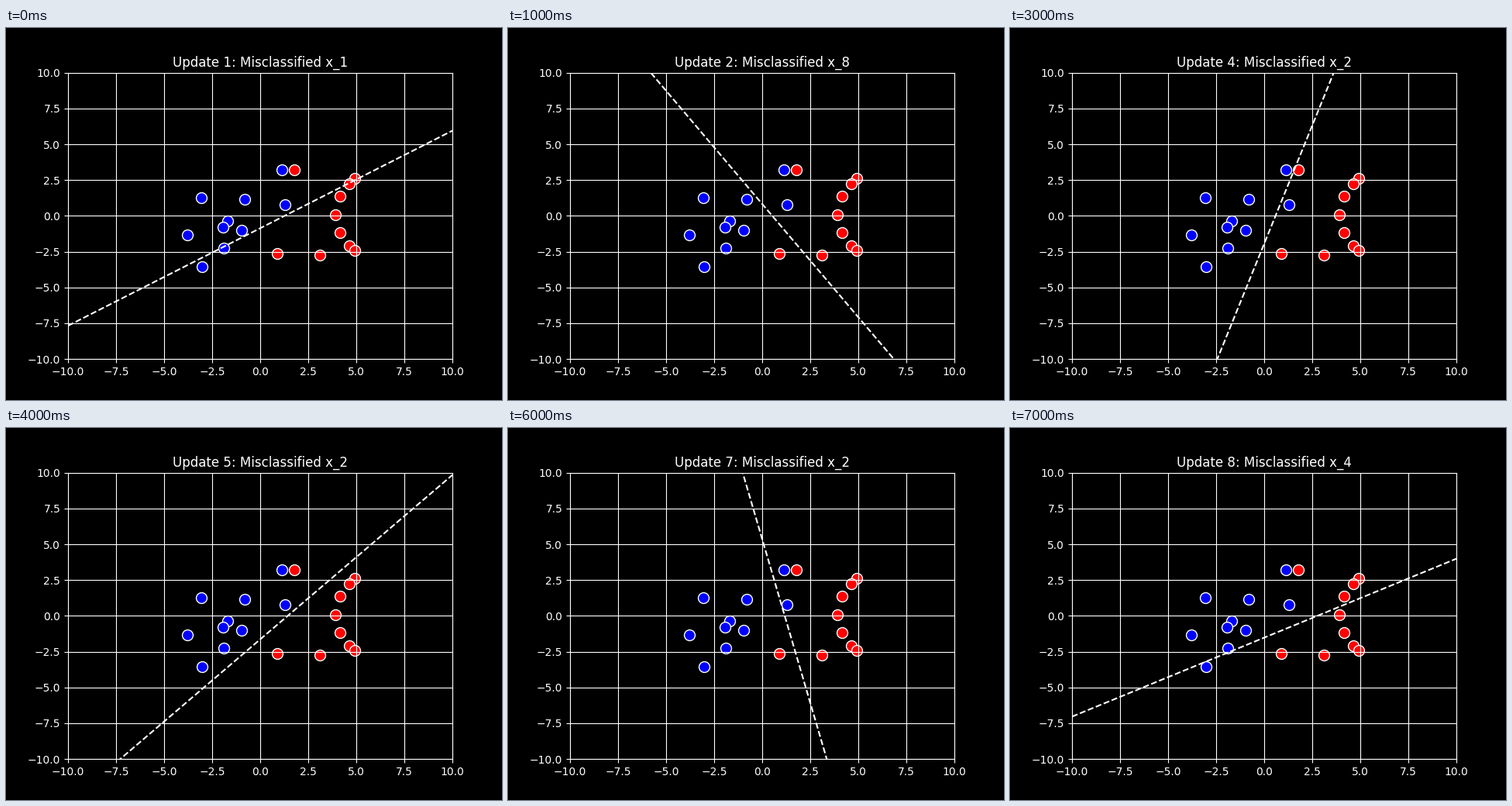
Write a matplotlib script that moves like this. It is 640 by 480 pixels and loops after 8 s.

```python
import numpy as np
import matplotlib.pyplot as plt
from matplotlib.animation import FuncAnimation

plt.style.use("dark_background")

# Key points by index: 0-9 are blue (+1), 10-19 are red (-1).
KEY = {
    1: (-0.79, 1.16), 2: (1.30, 0.80), 4: (1.11, 3.19), 8: (-3.02, -3.57),
    11: (0.89, -2.64), 13: (3.11, -2.76), 16: (1.76, 3.19),
}
UPDATES = [1, 8, 11, 2, 2, 16, 2, 4]


def label(i):
    return 1 if i < 10 else -1


def spiral(count):
    """Blue points winding in towards the middle of their class."""
    radius = np.linspace(2.4, 0, count)
    angle = np.radians(119 + 76 * np.arange(count))
    return np.column_stack([-1.92 + radius * np.cos(angle),
                            -0.81 + radius * np.sin(angle)])


def crescent(count):
    """Red points along a bow on the right."""
    t = np.linspace(0, np.pi, count)
    return np.column_stack([4.4 + 0.5 * np.cos(2 * t), 0.1 + 2.5 * np.cos(t)])


def key_points(sign):
    return [p for i, p in KEY.items() if label(i) == sign]


# Perceptron rule: each misclassified point adds label * (1, x, y).
weights = np.cumsum([label(i) * np.array([1, *KEY[i]]) for i in UPDATES], axis=0)

fig, ax = plt.subplots(figsize=(6.4, 4.8), dpi=100)
ax.set(xlim=(-10, 10), ylim=(-10, 10))
ax.grid(True)
for sign, rest, color in ((1, spiral(6), "blue"), (-1, crescent(7), "red")):
    points = np.vstack([key_points(sign), rest])
    ax.scatter(*points.T, s=100, c=color, edgecolors="white")

xs = np.array([-10, 10])
boundary, = ax.plot([], [], "w--")
title = ax.set_title("")


def draw(step):
    bias, wx, wy = weights[step]
    boundary.set_data(xs, -(bias + wx * xs) / wy)
    title.set_text(f"Update {step + 1}: Misclassified x_{UPDATES[step]}")
    return boundary, title


anim = FuncAnimation(fig, draw, frames=len(UPDATES), interval=1000,
                     init_func=lambda: draw(0), repeat=True, repeat_delay=0)
plt.show()
```
